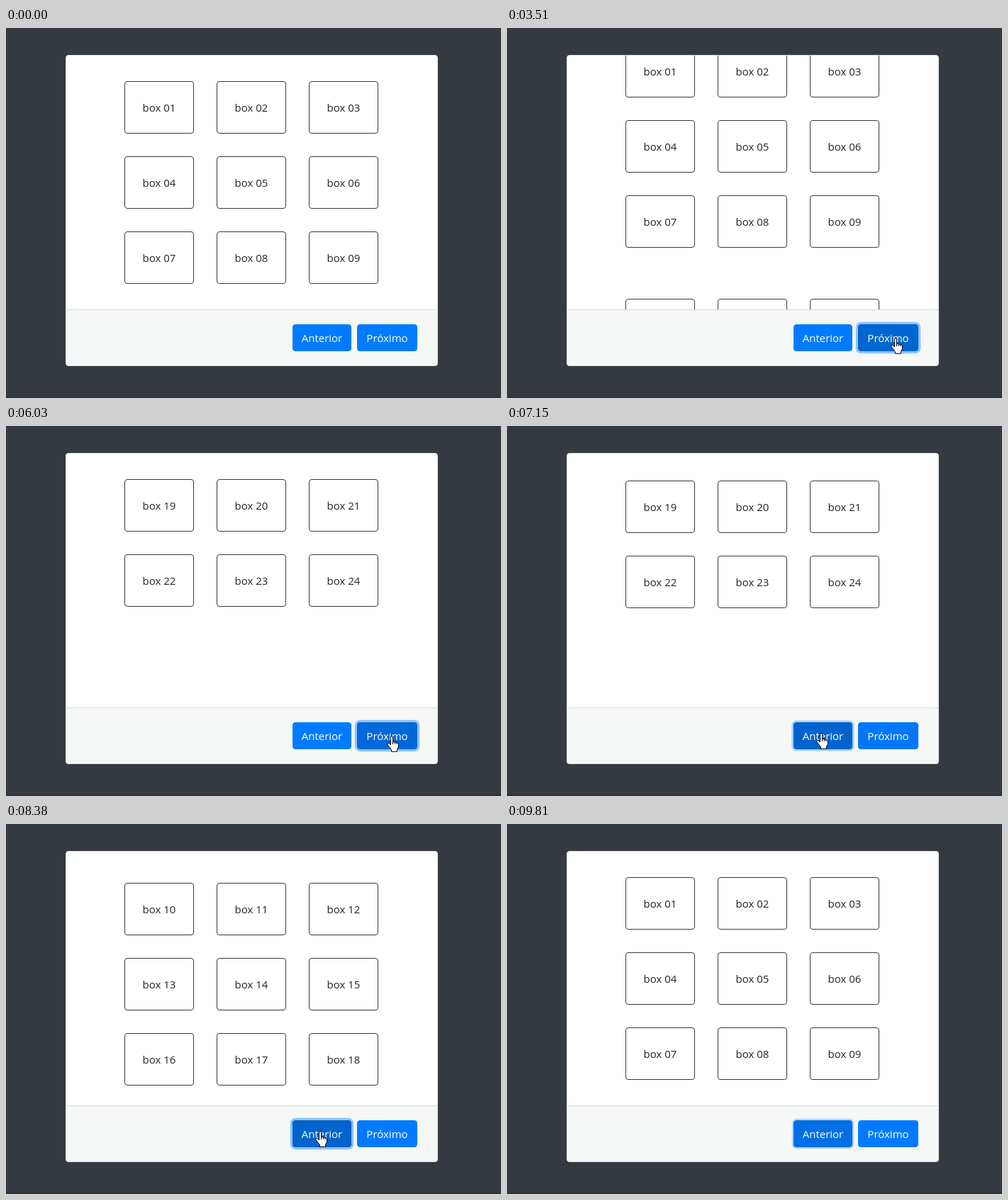
An HTML page for the animation above (9890 ms loop, 698x522 px).

```html
<!DOCTYPE html>
<html lang="pt-BR">
<head>
<meta charset="utf-8">
<title>Boxes</title>
<style>
  html, body { margin: 0; width: 100%; height: 100%; overflow: hidden; background: #343a40; }
  body { position: relative; font: 15px/24px "Open Sans", "Noto Sans", sans-serif; color: #212529; }
  div, svg { position: absolute; box-sizing: border-box; }
  #stage { left: 0; top: 0; width: 698px; height: 522px; overflow: hidden; }
  #edge { left: 0; bottom: 0; width: 698px; height: 3px; background: #303338; }
  #card { left: 84px; top: 38px; width: 525px; height: 439px; border: 1px solid #dfdfdf; border-radius: 4px; background: #fff; overflow: hidden; }
  #view { left: 0; top: 0; width: 523px; height: 358px; overflow: hidden; }
  #pages { left: 0; top: 0; width: 523px; height: 1074px; }
  #footer { left: 0; top: 358px; width: 523px; height: 79px; border-top: 1px solid #d8d9d9; background: #f6f7f7; }
  .box { width: 98px; height: 74px; border: 1px solid #343a40; border-radius: 4px; line-height: 72px; text-align: center; }
  .button { top: 418px; height: 38px; border: 1px solid; border-radius: 4px; line-height: 36px; text-align: center; }
  .button span { color: #fff; }
  #prev { left: 404px; width: 83px; }
  #next { left: 495px; width: 85px; }
  #press { left: -13.5px; top: -12.5px; width: 25px; height: 25px; border-radius: 50%; background: rgba(255, 255, 0, .5); }
  #pointer svg { top: 0; overflow: visible; fill: #fff; stroke: #000; stroke-linejoin: round; }
  #hand { left: -6px; }
  #arrow { left: 0; }
</style>
</head>
<body>
<div id="stage">
  <div id="edge"></div>
  <div id="card">
    <div id="view"><div id="pages"></div></div>
    <div id="footer"></div>
  </div>
  <div id="prev" class="button"><span>Anterior</span></div>
  <div id="next" class="button"><span>Próximo</span></div>
  <div id="pointer">
    <div id="press"></div>
    <svg id="hand" width="17" height="23">
      <path d="M5.5 13V2a1.5 1.5 0 0 1 3 0V8.2l2.6.6 2.6.7 1.6.6Q16.5 10.8 16.5 12v3.8L14.5 19.3v3h-8V19.9L1 12.8C.2 11.3 2 9.8 3.4 10.8z"/>
      <path d="M8.5 8v4M11.3 9v3M14 9.6v2.6" fill="none"/>
    </svg>
    <svg id="arrow" width="12" height="19">
      <path d="M.5.5v16l3.7-3.6 2.4 5.6 2.3-1-2.4-5.4h5z"/>
    </svg>
  </div>
</div>
<script>
const LOOP = 9890, PAGE = 358, SCROLL_MS = 300, FADE_MS = 150;
// The screen refreshes in even ticks, slightly ahead of zero.
const TICK = 78.6, LEAD = 32;

const $ = id => document.getElementById(id);
const clamp = u => Math.min(1, Math.max(0, u));
const mix = (a, b, p) => a + (b - a) * p;
const swing = u => .5 - Math.cos(Math.PI * u) / 2;
const easeIn = u => u * u;
const easeOut = u => 1 - (1 - u) ** 2;

// Scrolling starts when the button is released.
const CLICKS = [
  { id: "next", down: 3345, up: 3431 },
  { id: "next", down: 4915, up: 5050 },
  { id: "prev", down: 7000, up: 7107 },
  { id: "prev", down: 8200, up: 8349 }
];

// Spans in which a button is hovered or focused, and in which it has the focus ring.
const BUTTONS = {
  next: { lit: [[2140, 7000], [9240, 9290]], ring: [[3330, 7000]] },
  prev: { lit: [[6290, 9745]], ring: [[7000, 9745]] }
};

// Pointer moves; bend above 1 makes the path leave sideways first.
const MOVES = [
  { from: 1870, to: 2340, a: [690, 539], b: [547, 437], ease: easeOut, bend: 1 },
  { from: 5940, to: 6580, a: [547, 437], b: [442, 433], ease: swing, bend: 1 },
  { from: 9040, to: 9490, a: [442, 433], b: [706, 564], ease: easeIn, bend: 1.5 }
];

function pointerAt(t) {
  const m = MOVES.filter(m => m.from <= t).pop() || MOVES[0];
  const p = m.ease(clamp((t - m.from) / (m.to - m.from)));
  return [mix(m.a[0], m.b[0], p), mix(m.a[1], m.b[1], p ** m.bend)];
}

const fade = (t, [on, off]) => clamp((t - on) / FADE_MS) - clamp((t - off) / FADE_MS);
const level = (t, spans) => spans.reduce((sum, span) => sum + fade(t, span), 0);
const show = (id, on) => { $(id).style.display = on ? "block" : "none"; };

function paintButton(id, t) {
  const { lit, ring } = BUTTONS[id], style = $(id).style;
  const pressed = level(t, CLICKS.filter(c => c.id === id).map(c => [c.down, c.up]));
  const shade = level(t, lit) + .37 * pressed;
  const glow = level(t, ring);
  style.backgroundColor = `rgb(0, ${123 - 18 * shade}, ${255 - 38 * shade})`;
  style.borderColor = `rgb(0, ${123 - 24 * shade}, ${255 - 49 * shade})`;
  style.boxShadow = `0 0 0 ${3.2 * glow}px rgba(38, 143, 255, ${glow / 2})`;
}

function paintPointer(t) {
  const [x, y] = pointerAt(t);
  const inside = (left, right) => x >= left && x < right && y >= 418 && y < 456;
  const hand = inside(404, 487) || inside(495, 580);
  $("pointer").style.left = Math.round(x) + "px";
  $("pointer").style.top = Math.round(y) + "px";
  show("hand", hand);
  show("arrow", !hand);
  show("press", CLICKS.some(c => t >= c.down && t < c.up));
}

function draw(now) {
  const t = Math.floor((now % LOOP + LEAD) / TICK) * TICK - LEAD;
  const page = CLICKS.reduce((sum, c) =>
    sum + (c.id === "next" ? 1 : -1) * swing(clamp((t - c.up) / SCROLL_MS)), 0);
  $("pages").style.top = -Math.round(page * PAGE) + "px";
  paintButton("prev", t);
  paintButton("next", t);
  paintPointer(t);
}

for (let i = 0; i < 24; i++) {
  const box = document.createElement("div");
  box.className = "box";
  box.textContent = "box " + String(i + 1).padStart(2, "0");
  box.style.left = 82 + (i % 3) * 130 + "px";
  box.style.top = 36 + Math.floor(i / 9) * PAGE + Math.floor(i % 9 / 3) * 106 + "px";
  $("pages").append(box);
}

const start = performance.now();
function frame() {
  draw(performance.now() - start);
  requestAnimationFrame(frame);
}
frame();
</script>
</body>
</html>
```
